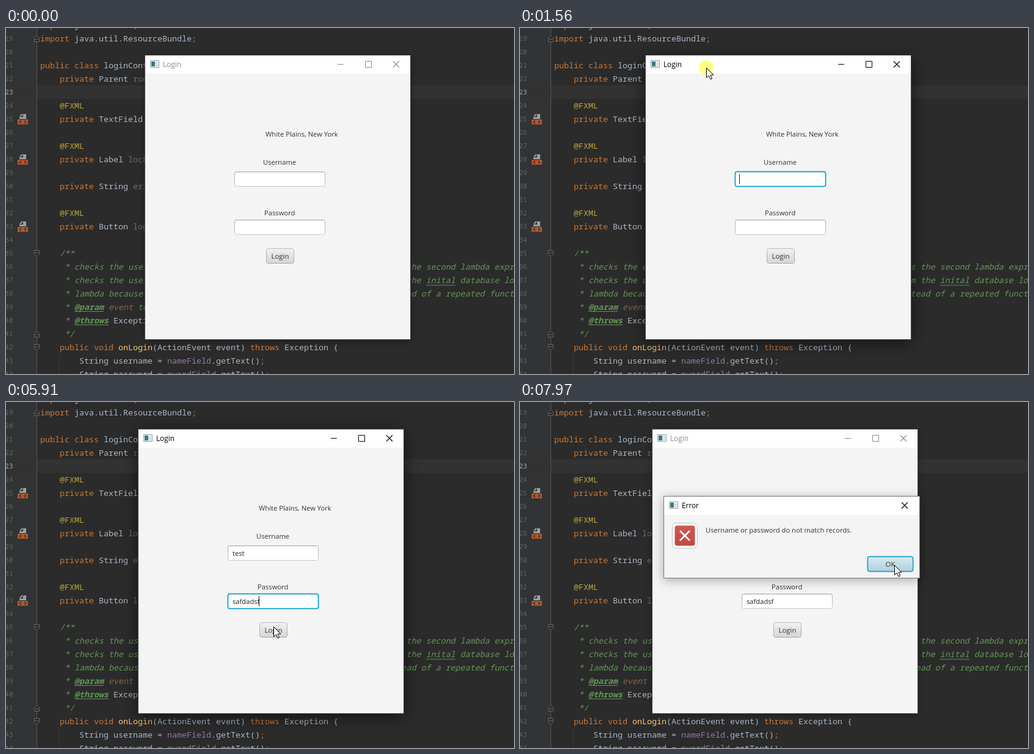
An HTML page with a canvas for the animation above (8000 ms loop, 832 px wide and 567 px high).

```html
<!DOCTYPE html>
<html lang="en">
<head>
<meta charset="utf-8">
<title>Login form</title>
<style>
  html, body { margin: 0; width: 100%; height: 100%; overflow: hidden; background: #2b2b2b; }
  canvas { display: block; }
</style>
</head>
<body>
<canvas id="stage" width="832" height="567"></canvas>
<script>
const W = 832, H = 567, LOOP = 8000;
const makeContext = () => Object.assign(document.createElement('canvas'), { width: W, height: H }).getContext('2d');
const stage = document.getElementById('stage').getContext('2d');
const editorLayer = makeContext(), dialogLayer = makeContext();
let ctx = stage;

const UI = '"Open Sans", "Noto Sans", sans-serif';
const MONO = '"Noto Sans Mono", "DejaVu Sans Mono", monospace';

// ---------- drawing helpers ----------
function rect(x, y, w, h, color) {
  ctx.fillStyle = color;
  ctx.fillRect(x, y, w, h);
}

function paint(fill, stroke, lineWidth = 1) {
  if (fill) { ctx.fillStyle = fill; ctx.fill(); }
  if (stroke) { ctx.strokeStyle = stroke; ctx.lineWidth = lineWidth; ctx.stroke(); }
}

function box(x, y, w, h, radius, fill, stroke, lineWidth) {
  ctx.beginPath();
  ctx.roundRect(x + .5, y + .5, w - 1, h - 1, radius);
  paint(fill, stroke, lineWidth);
}

function line(color, width, ...points) {
  ctx.beginPath();
  points.forEach(([x, y]) => ctx.lineTo(x, y));
  paint(null, color, width);
}

function cross(x, y, size, color, width) {
  line(color, width, [x, y], [x + size, y + size]);
  line(color, width, [x + size, y], [x, y + size]);
}

function label(text, x, y, color = '#333', size = 11.2, align = 'left') {
  ctx.font = `${size}px ${UI}`;
  ctx.textAlign = align;
  ctx.fillStyle = color;
  ctx.fillText(text, x, y);
}

function gradient(y, h, ...colors) {
  const g = ctx.createLinearGradient(0, y, 0, y + h);
  colors.forEach((color, i) => g.addColorStop(i / (colors.length - 1), color));
  return g;
}

function shadowedRect(x, y, w, h, blur, alpha) {
  ctx.save();
  ctx.shadowColor = `rgba(0,0,0,${alpha})`;
  ctx.shadowBlur = blur;
  ctx.shadowOffsetY = blur / 5;
  rect(x, y, w, h, '#f4f4f4');
  ctx.restore();
}

// ---------- code editor ----------
const rowY = n => 17 + 22 * (n - 19);
const TOKEN = {
  k: '#cc7832', d: '#a9b7c6', a: '#bba438', u: '#72696b', f: '#9876aa',
  m: '#ffc66d', c: '#629755', t: '#629755', p: '#8a653b'
};

// Each token begins with its colour key.
function code(n, column, ...tokens) {
  let x = 56 + column * 8;
  const y = rowY(n) + 5;
  ctx.textAlign = 'left';
  for (const token of tokens) {
    const key = token[0], text = token.slice(1);
    const style = key === 't' ? 'italic bold ' : 'cp'.includes(key) ? 'italic ' : '';
    ctx.font = `${style}13.333px ${MONO}`;
    ctx.fillStyle = TOKEN[key];
    ctx.fillText(text, x, y);
    if (key === 't') rect(x, y + 2, text.length * 8, 1, TOKEN.t);
    x += text.length * 8;
  }
}

function foldMark(n, up) {
  const y = rowY(n), s = up ? -1 : 1;
  ctx.beginPath();
  [[-4, -5], [4, -5], [4, 1], [0, 5], [-4, 1]].forEach(([px, py]) => ctx.lineTo(50.5 + px, y + .5 + s * py));
  ctx.closePath();
  paint('#2b2b2b', '#6a6a6a');
  rect(48, y - s, 5, 1, '#6a6a6a');
}

function fxmlIcon(n) {
  const y = rowY(n);
  rect(22, y - 3, 11, 3, '#9a9fa2');
  rect(28, y - 8, 5, 5, '#9a9fa2');
  line('#9a9fa2', 2, [23, y - 4], [27, y - 8]);
  rect(19, y + 1, 17, 8, '#b0572c');
  for (const s of [-1, 1]) {
    line('#3b2a22', 1.2, [27.5 + 2.5 * s, y + 2.5], [27.5 + 5.5 * s, y + 5], [27.5 + 2.5 * s, y + 7.5]);
  }
}

function drawEditor() {
  rect(0, 0, W, H, '#2b2b2b');
  rect(0, 0, 50, H, '#313335');
  rect(0, 94, W, 22, '#323232');
  rect(50, 0, 1, H, '#555');
  rect(87, 534, 1, 33, '#3b3b3b');
  ctx.font = `11px ${MONO}`;
  ctx.textAlign = 'right';
  for (let n = 19; n <= 44; n++) {
    ctx.fillStyle = n === 23 ? '#a4a3a3' : '#606366';
    ctx.fillText(n, 11.5, rowY(n) + 4);
  }
  for (const n of [25, 28, 33]) fxmlIcon(n);
  for (const n of [19, 35, 41, 42]) foldMark(n, n === 19 || n === 41);

  code(18, 0, 'kimport ', 'djava.net.URL', 'k;');
  code(19, 0, 'kimport ', 'djava.util.ResourceBundle', 'k;');
  code(21, 0, 'kpublic class ', 'dloginController');
  code(22, 4, 'kprivate ', 'dParent ', 'uroot', 'k;');
  for (const n of [24, 27, 32]) code(n, 4, 'a@FXML');
  code(25, 4, 'kprivate ', 'dTextField ', 'fnameField', 'k;');
  code(28, 4, 'kprivate ', 'dLabel ', 'ulocField', 'k;');
  code(30, 4, 'kprivate ', 'dString ', 'uerror', 'k;');
  code(33, 4, 'kprivate ', 'dButton ', 'ulogin', 'k;');
  code(35, 4, 'c/**');
  code(36, 5, 'c* checks the username'.padEnd(66) + 'uses the second lambda expression');
  code(37, 5, 'c* checks the username'.padEnd(66) + 'from the inital database lookup');
  code(38, 5, 'c* lambda because it'.padEnd(66) + 'instead of a repeated function');
  code(39, 5, 'c* ', 't@param', 'p event', 'c the');
  code(40, 5, 'c* ', 't@throws', 'd Exception');
  code(41, 5, 'c*/');
  code(42, 4, 'kpublic void ', 'monLogin', 'd(ActionEvent event) ', 'kthrows ', 'dException {');
  code(43, 8, 'dString username = ', 'fnameField', 'd.getText()', 'k;');
  code(44, 8, 'dString password = ', 'fpwordField', 'd.getText()', 'k;');

  const wave = Array.from({ length: 25 }, (_, i) => [688 + i * 2, i % 2 ? 422.5 : 420.5]);
  line('#659c6b', 1, ...wave);
}

// ---------- windows ----------
function titleBar(title, x, y, w, ink) {
  rect(x, y, w, 30, '#fff');
  box(x + 8, y + 8, 15, 12, 0, '#f2f5f6', '#8f9ca3');
  rect(x + 10, y + 10, 6, 8, gradient(y + 8, 12, '#2f6f9a', '#3f8578'));
  rect(x + 17, y + 11, 4, 7, '#d5dde0');
  label(title, x + 29, y + 19, ink, 11.8);
  cross(x + w - 28, y + 9.5, 10, ink, 1.1);
}

function field(x, y, text, focused, caret) {
  if (focused) box(x - 1, y - 1, 151, 27, 4, null, 'rgba(3,158,211,.25)');
  box(x, y, 149, 25, 3, gradient(y, 25, '#ececec', '#fff', '#fff', '#fff', '#fff', '#fff'),
    focused ? '#039ed3' : gradient(y, 25, '#a9a9a9', '#c8c8c8'), focused ? 1.5 : 1);
  label(text, x + 8, y + 17, '#222');
  if (focused && caret) rect(Math.round(x + 7 + ctx.measureText(text).width), y + 4, 1, 17, '#222');
}

function button(text, x, y, w, focused, ...colors) {
  if (focused) box(x - 1, y - 1, w + 2, 27, 4, null, 'rgba(3,158,211,.35)');
  box(x, y, w, 25, 3, gradient(y, 25, ...colors),
    focused ? '#209cc8' : gradient(y, 25, '#bdbdbd', '#a3a3a3'), focused ? 1.4 : 1);
  label(text, x + w / 2, y + 17, '#333', 11.4, 'center');
}

function drawLogin(s) {
  const x = Math.round(s.window.x), y = Math.round(s.window.y);
  const ink = s.active ? '#000' : '#8c8c8c';
  shadowedRect(x, y, 434, 465, s.active ? 26 : 12, s.active ? .6 : .4);
  box(x - 1, y - 1, 436, 467, 0, null, '#4c4c4c');
  titleBar('Login', x, y, 434, ink);
  rect(x + 315, y + 14, 10, 1, ink);
  box(x + 360, y + 9, 11, 11, 0, null, ink);
  label('White Plains, New York', x + 197, y + 133);
  label('Username', x + 193, y + 179);
  label('Password', x + 195, y + 262);
  field(x + 146, y + 190, s.username, s.focus === 'user', s.caret);
  field(x + 146, y + 269, s.password, s.focus === 'pass', s.caret);
  button('Login', x + 198, y + 316, 46, s.focus === 'login', '#f3f3f3', '#e2e2e2', '#d6d6d6');
}

function drawDialog(hover) {
  ctx.clearRect(0, 0, W, H);
  shadowedRect(235, 154, 420, 135, 16, .3);
  titleBar('Error', 236, 155, 417, '#000');
  box(235, 154, 420, 135, 0, null, '#777');
  box(249, 198, 42, 42, 6, '#fff', '#c4c4c4');
  box(253, 202, 34, 34, 4, gradient(202, 34, '#cf5a55', '#bf4744'));
  cross(262, 211, 16, '#fff', 2.6);
  label('Username or password do not match records.', 304, 214);
  button('OK', 569, 253, 75, true, ...(hover ? ['#d9ebf1', '#aed0dc'] : ['#bfe0ec', '#94c8dc']));
}

function drawDialogFading({ dialog, pointer }) {
  ctx = dialogLayer;
  drawDialog(pointer.x > 569 && pointer.x < 644 && pointer.y > 253);
  ctx = stage;
  const scale = .95 + .05 * dialog;
  ctx.save();
  ctx.globalAlpha = dialog;
  ctx.translate(444.5, 221.5);
  ctx.scale(scale, scale);
  ctx.drawImage(dialogLayer.canvas, -444.5, -221.5);
  ctx.restore();
}

// ---------- pointer ----------
function drawPointer({ pointer, pressed, overField }) {
  const x = Math.round(pointer.x), y = Math.round(pointer.y);
  if (pressed) {
    ctx.beginPath();
    ctx.arc(x - (overField ? 2 : 0), y, 12, 0, 7);
    paint('rgba(255,255,70,.68)');
  }
  if (overField) {
    for (const edge of [-7.5, 7.5]) line('#000', 1, [x - 3, y + edge], [x + 4, y + edge]);
    line('#000', 1, [x + .5, y - 7.5], [x + .5, y + 7.5]);
    return;
  }
  ctx.beginPath();
  [[0, 0], [0, 16], [4, 12.5], [6.5, 18.5], [9, 17.5], [6.5, 11.5], [11.5, 11.5]]
    .forEach(([px, py]) => ctx.lineTo(x + .5 + px, y + .5 + py));
  ctx.closePath();
  paint('#fff', '#000');
}

// ---------- timeline ----------
const progress = (t, start, length) => Math.min(1, Math.max(0, (t - start) / length));
const between = (t, from, to) => t >= from && t < to;
const typed = (text, t, start, gap) => text.slice(0, Math.max(0, 1 + Math.floor((t - start) / gap)));

const captured = t => Math.floor((t - 5) / 67.5) * 67.5 + 5;

// The window swings out to the upper left and comes back a little left of its start.
function windowAt(t) {
  const k = progress(t, 1214, 404), lift = Math.min(1, k * 1.168);
  return {
    x: 228 - 11 * k - 50 * Math.abs(Math.sin(Math.PI * k)) ** 1.75,
    y: 45 - 20 * Math.sin(Math.PI * lift) ** 4
  };
}

function glide(pos, t, start, end, x, y) {
  const k = progress(t, start, end - start), ease = k * k * (3 - 2 * k);
  pos.x += (x - pos.x) * ease;
  pos.y += (y - pos.y) * ease;
}

function pointerAt(t) {
  if (t < 1080) {
    const angle = Math.PI * 1.45 * progress(t, 240, 780);
    return { x: 372 + 351 * Math.cos(angle), y: 267 + 231 * Math.sin(angle) };
  }
  // While dragging, the hand is slightly ahead of the window.
  const pos = { x: windowAt(t + 30).x + 91, y: windowAt(t).y + 20.5 };
  glide(pos, t, 1627, 1900, 424, 315);
  glide(pos, t, 3300, 3700, 422, 316);
  glide(pos, t, 5500, 5640, 439, 367);
  glide(pos, t, 5840, 6110, 428, 378);
  glide(pos, t, 6700, 7180, 318, 222);
  glide(pos, t, 7180, 7600, 668, 240);
  glide(pos, t, 7600, 7900, 613, 267);
  return pos;
}

// The caret stays solid while typing, then blinks from the last key.
function caretAt(t) {
  const lastKey = t < 3300 ? 1100 : Math.min(t, t < 5030 ? 3700 : 5520);
  return (t - lastKey) % 1000 < 465;
}

function focusAt(t) {
  if (!between(t, 1090, 6580)) return '';
  return t < 4620 ? 'user' : t < 6380 ? 'pass' : 'login';
}

function stateAt(time) {
  const t = captured(time), win = windowAt(t), pointer = pointerAt(t);
  const overColumn = between(pointer.x - win.x, 146, 295), dy = pointer.y - win.y;
  return {
    window: win,
    pointer,
    overField: time < 6500 && overColumn && (between(dy, 190, 215) || between(dy, 267, 294)),
    pressed: between(time, 1090, 1627) || between(time, 4560, 4830) || between(time, 6380, 6510),
    active: between(time, 1090, 6580),
    focus: focusAt(time),
    caret: caretAt(time),
    username: typed('test', time, 3300, 133),
    password: typed('safdadsf', time, 5030, 68),
    dialog: progress(t, 6552, 160)
  };
}

function render() {
  const time = performance.now() % LOOP, state = stateAt(time);
  ctx.drawImage(editorLayer.canvas, 0, 0);
  drawLogin(state);
  if (state.dialog) drawDialogFading(state);
  if (time >= 240) drawPointer(state);
  requestAnimationFrame(render);
}

ctx = editorLayer;
drawEditor();
ctx = stage;
render();
</script>
</body>
</html>
```
